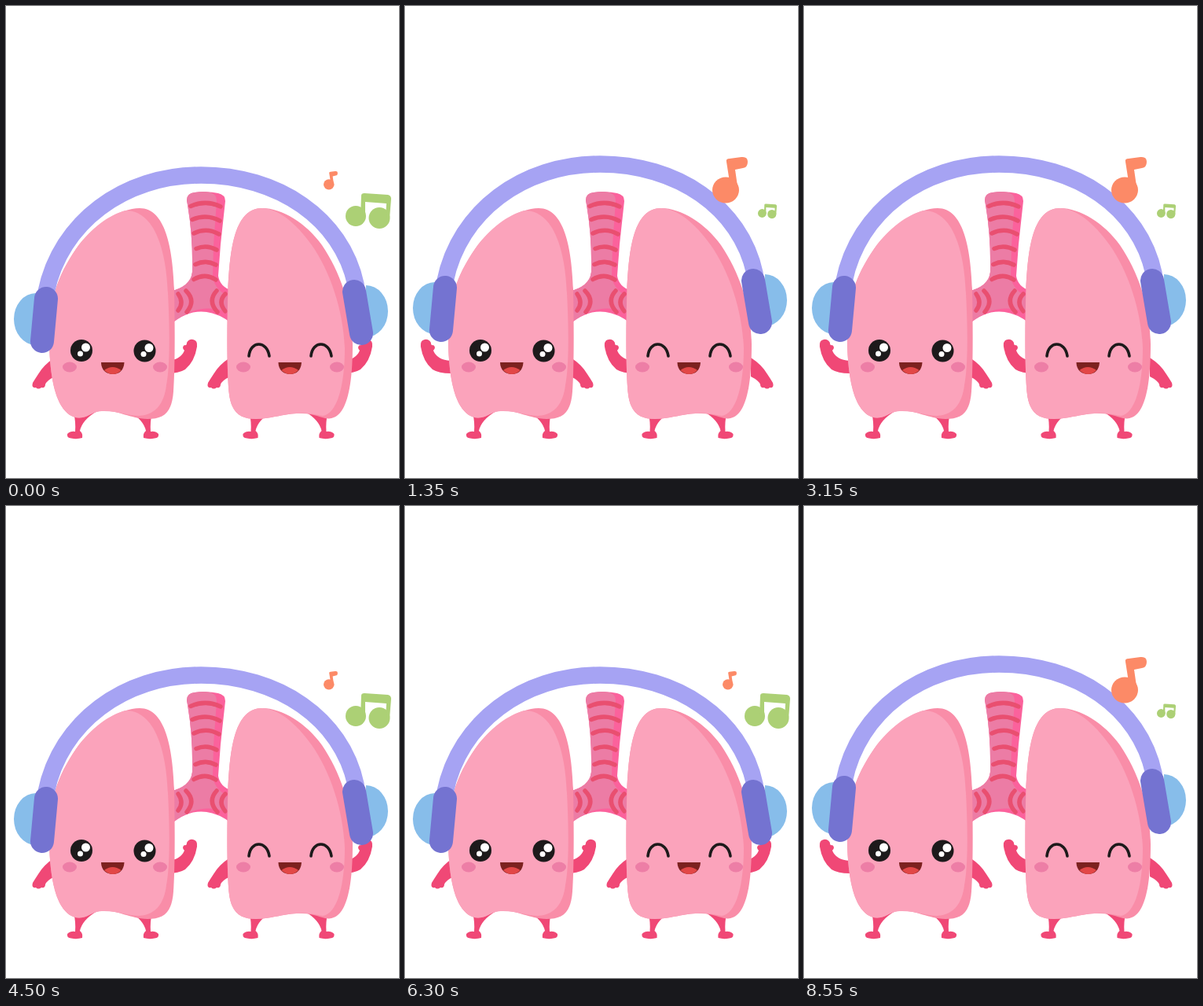
An HTML page that plays this animation: 500 px wide and 600 px high, repeating every 9 s.

```html
<!DOCTYPE html>
<html lang="en">
<head>
<meta charset="utf-8">
<title>Dancing lungs</title>
<style>
  html, body { margin: 0; width: 100%; height: 100%; overflow: hidden; background: #fff; }
  svg { display: block; width: 500px; height: 600px; }
  .down, .up { animation: beat 900ms step-end infinite; }
  .up { animation-delay: -450ms; }
  .phones { animation: bob 900ms step-end infinite; }
  @keyframes beat { 0% { visibility: visible; } 50%, 100% { visibility: hidden; } }
  @keyframes bob { 0% { transform: none; } 50%, 100% { transform: translateY(-14px); } }
  .limb { fill: #f04876; }
  .side { fill: #f98da8; }
  .front { fill: #fba3bb; }
  .line { fill: none; stroke-linecap: round; }
  .orange { fill: #fc8a67; }
  .green { fill: #acd075; }
</style>
</head>
<body>
<svg viewBox="0 0 500 600">
  <defs>
    <path id="leg" d="M86 515H116Q97 526 94 540Q98 543 97 549Q90 551 83 549.500Q77 549 78 544Q82 540 88 541Q89 530 86 515Z"/>
    <g id="legs">
      <use href="#leg"/>
      <use href="#leg" transform="matrix(-1 0 0 1 272 0)"/>
    </g>
    <path id="low" d="M62 447Q48 456 41 468Q37 474 34 479Q32 486 38 485Q41 488 45 485Q50 486 50 481Q52 476 62 471Z"/>
    <path id="high" d="M205 451Q222 450 227 438Q223 434 227 431Q230 432 230 428Q233 423 238 424Q244 425 243 433Q240 452 228 462Q220 467 205 467Z"/>
    <g id="mouth">
      <path fill="#7c211f" d="M121 453H150.500C150 463 144 468 136 468S121 463 121 453Z"/>
      <path fill="#e24747" d="M125 463Q135.500 455 146.500 463Q142 468 136 468T125 463Z"/>
    </g>
    <g id="eye">
      <circle r="14" fill="#1d1a1b"/>
      <g fill="#fff">
        <circle cx="5.500" cy="-4" r="5.500"/>
        <circle cx="-1.500" cy="4" r="3.500"/>
      </g>
    </g>
    <ellipse id="cheek" rx="9" ry="6.500" fill="#ed7ea6"/>
    <g id="single">
      <ellipse cx="408" cy="234" rx="17" ry="16.500"/>
      <path d="M409 198Q408 194 413 194L428 192Q436 191 436 198Q436 205 430 206L420 208L424 236L414 230Z"/>
    </g>
    <g id="pair">
      <circle cx="445" cy="267" r="13"/>
      <circle cx="475" cy="269.500" r="13.500"/>
      <path d="M452 241Q452 238 456 238L486 240Q490 241 490 245L488 270H483L484 251L457 249L457 268H451Z"/>
    </g>
  </defs>

  <g class="limb">
    <use href="#legs"/>
    <use href="#legs" x="223.500"/>
    <g class="down">
      <use href="#low"/>
      <use href="#high"/>
      <use href="#low" x="223"/>
      <use href="#high" x="223"/>
    </g>
    <g class="up">
      <use href="#high" transform="matrix(-1 0 0 1 263 0)"/>
      <use href="#low" transform="matrix(-1 0 0 1 273 0)"/>
      <use href="#high" transform="matrix(-1 0 0 1 497 0)"/>
      <use href="#low" transform="matrix(-1 0 0 1 502 0)"/>
    </g>
  </g>

  <path fill="#fb629c" d="M230 247Q230 238 240 237Q255 235 270 238Q279 240 279 248L273 303L270 343Q272 357 288 362V404Q246 372 208 406V363Q235 357 237 338Q238 290 230 247Z"/>
  <path fill="#ec7ca5" d="M230 247Q230 238 240 237Q251 235 260 237Q268 239 268 248L264 305L263 343Q265 362 288 372V392Q246 372 208 406V363Q235 357 237 338Q238 290 230 247Z"/>
  <g class="line" stroke="#e94f70" stroke-width="5.500">
    <path d="M235 254.500Q254 246 273 255M237 271.500Q255 264 272 273M239 289Q255 281 271 290M242 308.500Q255 303 268 310M241 328.500Q254 322 267 329M239 347.500Q253 339 267 348"/>
    <path d="M219 366Q227 377 219 387M229 362Q242 375 230 389M268 362Q256 375 269 389M279 366Q269 376 279 388"/>
  </g>

  <path class="side" d="M170 257C203 257 212 308 214 360C215 410 215 460 213 490C211 518 200 525 180 525C157 524 144 514.500 125 514.500C108 514.500 107 523 93 523.500C72 523 55 495 55 420C55 375 65 344 89 309C111 278 145 257 170 257Z"/>
  <path class="front" d="M152 260C190 260 204 312 206 365C209 420 208 462 204 482C201 508 188 520 169 521C152 520 143 515 125 515C108 515 107 523 93 523.500C72 523 55 495 55 420C55 375 65 344 89 309C108 282 132 265 152 260Z"/>
  <path class="side" d="M326 257C291 257 285 308 282.500 360C281 410 281 460 283.500 490C286 518 299 525 318 525C342 524 353 518 373 518C392 517 399 524 411 524.500C435 523 441 480 441 430C440 380 425 338 402 304C382 276 351 257 326 257Z"/>
  <path class="front" d="M326 257C291 257 285 308 282.500 360C281 410 281 460 283.500 490C286 518 299 525 318 525C342 524 353 518 373 518C387 517 394 520 403 521C424 517 431 475 431 435C429 385 412 337 389 304C368 275 347 258 326 257Z"/>

  <use href="#cheek" x="81" y="459"/>
  <use href="#cheek" x="196" y="459"/>
  <use href="#cheek" x="302" y="459"/>
  <use href="#cheek" x="421" y="459"/>
  <use href="#mouth"/>
  <use href="#mouth" x="225.500"/>
  <use href="#eye" x="96" y="438"/>
  <use href="#eye" x="176.500" y="438.500"/>
  <path class="line" stroke="#1d1a1b" stroke-width="3.600" d="M309 445C311 425 332 425 335 445M388 445C390 425 411 425 414 445"/>

  <g class="phones">
    <path fill="#87bdea" d="M38 365A28 33 0 0 0 38 431ZM458 355A28 33 0 0 1 458 421Z"/>
    <path class="line" stroke="#a6a3f3" stroke-width="21.500" d="M51 364C69 275 150 215 248 215S427 270 445 354"/>
    <path class="line" stroke="#7473d1" stroke-width="30" d="M51 372L46 426M443 363L452 416"/>
  </g>

  <g class="down">
    <use class="orange" href="#single" transform="translate(247.600 133.200) scale(.4)"/>
    <use class="green" href="#pair"/>
  </g>
  <g class="up">
    <use class="orange" href="#single"/>
    <use class="green" href="#pair" transform="translate(269.700 152.700) scale(.415)"/>
  </g>
</svg>
</body>
</html>
```
